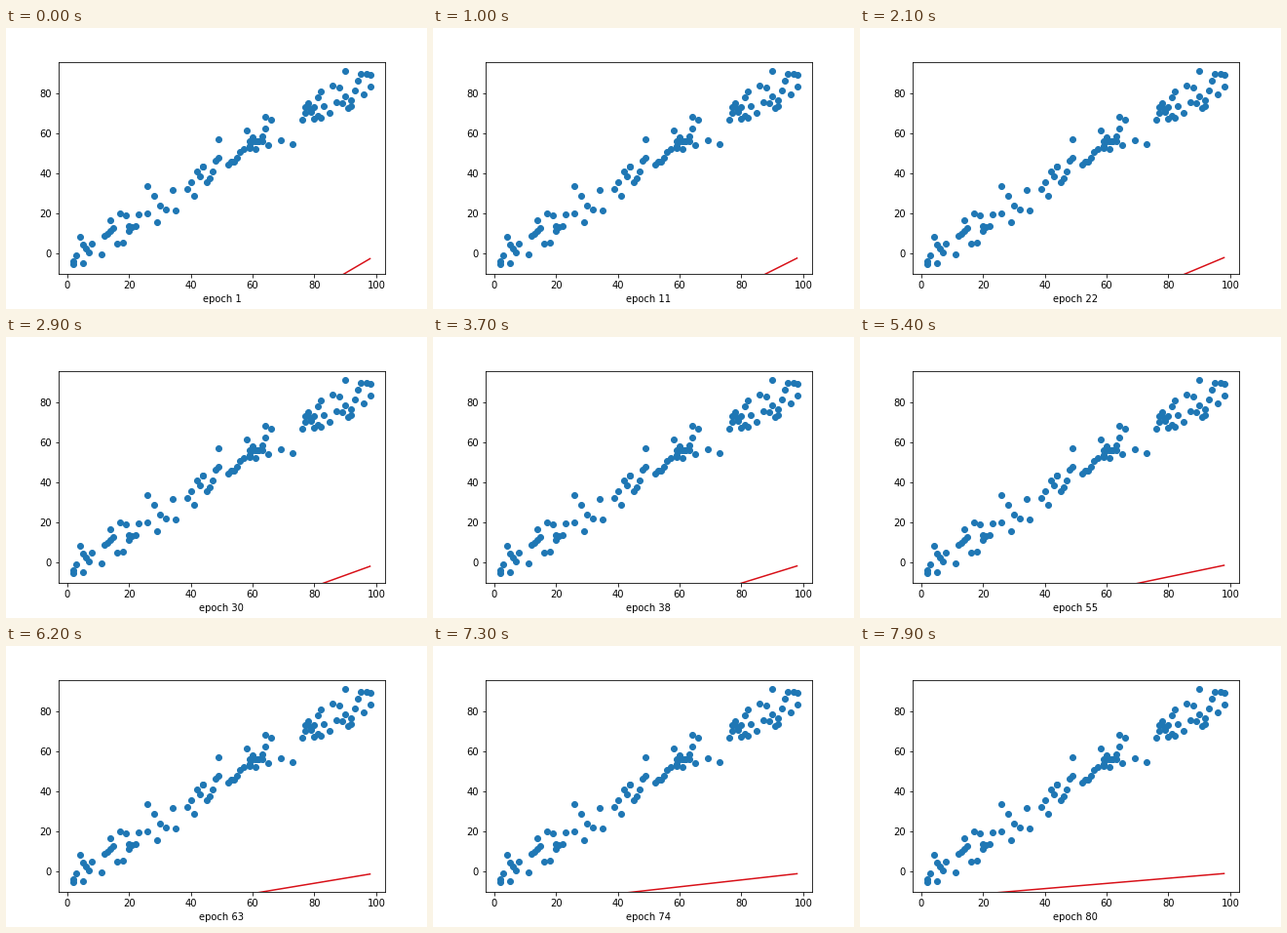
Animation, 432 px wide and 288 px high, one loop 8000 ms. Source, as a matplotlib script:

```python
import numpy as np
import matplotlib.pyplot as plt
from matplotlib.animation import FuncAnimation

EPOCHS = 80
STEP_MS = 100
X_END = 98
SPREAD = 4.5

# Stretches of the x axis that hold data: first x, last x, point count
GROUPS = [(2, 8, 8), (11, 23, 15), (26, 35, 7), (39, 49, 12),
          (52, 66, 16), (76, 83, 14), (85, 98, 15)]
TREND_X, TREND_Y = [2, 30, 60, 98], [-1, 24, 56, 86]
LANDMARKS = [(2, -5.4), (26, 33.7), (49, 57), (64, 68.3),
             (69, 56.6), (73, 54.6), (90, 91.2), (98, 89.3)]


def make_data():
    """Scatter around a rising trend, plus a flat row and a few landmarks."""
    rng = np.random.default_rng(4)
    x = np.concatenate([np.linspace(*group).round() for group in GROUPS])
    noise = rng.normal(0, SPREAD, x.size).clip(-1.7 * SPREAD, 1.7 * SPREAD)
    y = (np.interp(x, TREND_X, TREND_Y) + noise).clip(-5, 90)
    row = [(i, 56) for i in range(59, 64)]
    return np.vstack([np.column_stack([x, y]), row, LANDMARKS])


def fit(step):
    """Regression line after a number of gradient steps."""
    progress = 1 - np.exp(-0.0085 * step)
    slope = 0.905 - 1.585 * progress
    y_end = -2.6 + 3.2 * progress
    return y_end + slope * (fit_x - X_END)


fig, ax = plt.subplots(figsize=(6, 4), dpi=72)
fig.subplots_adjust(left=0.125, right=0.9, bottom=0.125, top=0.88)
ax.scatter(*make_data().T)
line, = ax.plot([], [], color="#d81018")
ax.set_xlim(-2.79, 102.82)
ax.set_ylim(-10.2, 95.9)
label = ax.set_xlabel("epoch 1")
fit_x = np.array([2, X_END])


def update(step):
    line.set_data(fit_x, fit(step))
    label.set_text(f"epoch {step + 1}")
    return line, label


anim = FuncAnimation(fig, update, frames=EPOCHS, interval=STEP_MS,
                     repeat=True, repeat_delay=0, blit=False)
plt.show()
```
